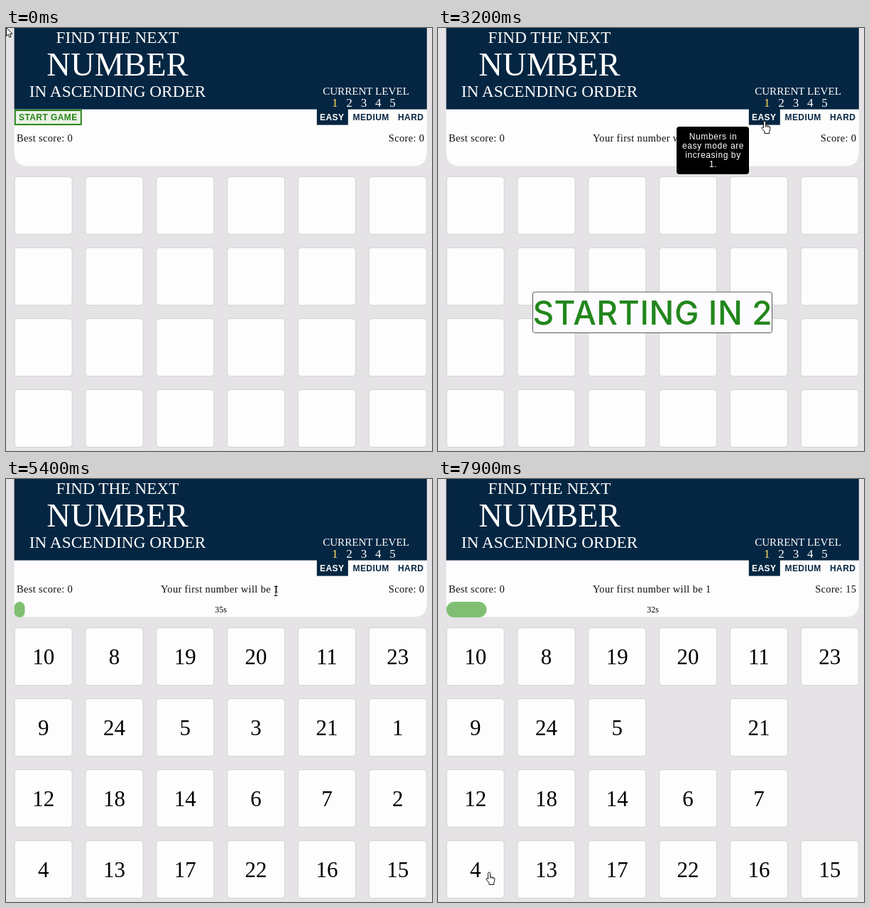
Animation of 600 by 596 pixels, one loop 8000 ms. Source, as an HTML page:

```html
<!DOCTYPE html>
<html lang="en">
<head>
<meta charset="utf-8">
<title>Find the next number</title>
<style>
  html, body { margin: 0; width: 100%; height: 100%; overflow: hidden; background: #e5e3e5; }
  svg { display: block; width: 600px; height: 596px; }
  text { white-space: pre; }
  .serif { font-family: "Liberation Serif", "Times New Roman", serif; }
  .sans { font-family: "Liberation Sans", Arial, sans-serif; }
  .title { fill: #fff; text-anchor: middle; }
  .label { font-weight: bold; font-size: 12px; letter-spacing: .42px; }
  .info { font-size: 14.5px; letter-spacing: .33px; fill: #111; }
  .tile rect { fill: #fefdfe; stroke: #d3d2d4; }
  .tile text { font-size: 31px; text-anchor: middle; }
  .tip { font-size: 12px; letter-spacing: .6px; text-anchor: middle; }
  .tip text { fill: #fff; }
  .count { font: 500 46px Montserrat, Inter, sans-serif; letter-spacing: .6px; fill: #22871c; text-anchor: middle; }
  #cursor path { fill: #fff; stroke: #111; stroke-linejoin: round; }
</style>
</head>
<body>
<svg id="stage" viewBox="0 0 600 596">
  <path d="M11.6 114H592.8V175Q592.8 194.6 573 194.6H32Q11.6 194.6 11.6 175Z" fill="#fefdfe"/>
  <rect x="11.6" width="581.2" height="114.6" fill="#052642"/>
  <g class="serif title">
    <text x="157" y="20.5" font-size="23.3">FIND THE NEXT</text>
    <text x="157" y="67" font-size="46.6">NUMBER</text>
    <text x="157" y="97" font-size="23.3">IN ASCENDING ORDER</text>
    <text x="507" y="93.5" font-size="15.1">CURRENT LEVEL</text>
    <g id="levels" font-size="17"></g>
  </g>
  <g class="sans label">
    <rect x="437.8" y="114" width="44" height="22.6" fill="#052642"/>
    <text x="442" y="129.5" fill="#fff">EASY</text>
    <text x="488.5" y="129.5" fill="#052642">MEDIUM</text>
    <text x="552" y="129.5" fill="#052642">HARD</text>
    <g id="start">
      <rect x="12.8" y="116" width="93" height="20" fill="#eaf2e5" stroke="#28841b" stroke-width="2"/>
      <text x="18" y="129.5" fill="#28841b">START GAME</text>
    </g>
    <g id="startHover">
      <rect x="11.6" y="115" width="92.4" height="21.6" fill="#28801a"/>
      <text x="16.5" y="129.5" fill="#fff">START GAME</text>
    </g>
  </g>
  <g class="serif info">
    <text x="15" y="160">Best score: 0</text>
    <text id="first" x="218" y="160">Your first number will be 1</text>
    <text id="score" x="589.3" y="160" text-anchor="end"></text>
  </g>
  <g id="timer">
    <rect id="bar" x="11.8" y="173" height="22" fill="#80bf73"/>
    <text id="seconds" class="serif" x="302.5" y="188" font-size="12" text-anchor="middle"></text>
  </g>
  <g id="tiles" class="serif"></g>
  <g id="dialog">
    <rect id="dialogBox" y="372" height="57.5" rx="3" fill="#fcfbfd" stroke="#5a5a5c"/>
    <text id="dialogText" class="count" x="302.3" y="418"></text>
  </g>
  <g id="tooltip" class="sans tip">
    <rect x="336" y="139" width="102" height="67" rx="4"/>
    <text x="387.5" y="156.5">Numbers in</text>
    <text x="387.5" y="169.5">easy mode are</text>
    <text x="387.5" y="182.5">increasing by</text>
    <text x="387.5" y="195.5">1.</text>
  </g>
  <g id="cursor">
    <path id="arrow" d="M.5 .5V12.5L3.2 10L5 14.2L7 13.4L5.2 9.3H9Z"/>
    <g id="hand">
      <path d="M-1.5 1.5C-1.5-.4 1.5-.4 1.5 1.5V6.5L6.3 7.6Q8.3 8.2 8 10.5L6.7 15V17.5H0V15L-3.8 10.6Q-4.6 8.4-2.4 8.8L-1.5 9.8Z"/>
      <path d="M1.5 6.5V9M4 7V9.3M6.2 7.8V9.8" stroke-width=".8"/>
    </g>
    <path id="beam" d="M-2.5-6.5H2.5M0-6.5V6.5M-2.5 6.5H2.5"/>
  </g>
</svg>
<script>
const LOOP = 8000, STEP = 100;
const CLICK = 1600, GO = 4600, SECOND = 1000;
const PICKS = [6400, 6800, 7500];
const NUMBERS = [10, 8, 19, 20, 11, 23, 9, 24, 5, 3, 21, 1,
                 12, 18, 14, 6, 7, 2, 4, 13, 17, 22, 16, 15];
// time, x, y of the pointer's hot spot
const PATH = [
  [100, 0, -1], [900, 60, 119], [1100, 62, 122], [1700, 62, 122],
  [2200, 460, 136], [2500, 460, 136], [3000, 460, 131], [4700, 460, 131],
  [5200, 380, 158], [5500, 380, 158], [6200, 544, 368], [6400, 544, 382],
  [6700, 550, 440], [6900, 550, 442], [7400, 355, 352], [7500, 355, 352],
  [7900, 72, 554]
];

const $ = id => document.getElementById(id);
const show = (id, on) => $(id).setAttribute("display", on ? "inline" : "none");
const set = (id, attrs) => {
  for (const name in attrs) $(id).setAttribute(name, attrs[name]);
};
const within = (p, x, y, w, h) => p.x >= x && p.x <= x + w && p.y >= y && p.y <= y + h;

const tiles = NUMBERS.map((number, i) => ({
  number,
  x: 12.2 + (i % 6) * 99.8,
  y: 209.7 + Math.floor(i / 6) * 99.95
}));

$("levels").innerHTML = [1, 2, 3, 4, 5].map(n =>
  `<text x="${443 + n * 20.3}" y="111" fill="${n === 1 ? "#ffe25e" : "#fff"}">${n}</text>`
).join("");

$("tiles").innerHTML = tiles.map(({ number, x, y }) =>
  `<g class="tile" id="tile${number}">
     <rect x="${x}" y="${y}" width="81" height="81" rx="4"/>
     <text x="${x + 40.5}" y="${y + 51.3}">${number}</text>
   </g>`
).join("");

function pointerAt(t) {
  const next = PATH.findIndex(key => key[0] > t);
  if (next === 0) return { x: PATH[0][1], y: PATH[0][2] };
  if (next < 0) return { x: PATH.at(-1)[1], y: PATH.at(-1)[2] };
  const [t0, x0, y0] = PATH[next - 1], [t1, x1, y1] = PATH[next];
  const u = (t - t0) / (t1 - t0), e = u * u * (3 - 2 * u);
  return { x: x0 + (x1 - x0) * e, y: y0 + (y1 - y0) * e };
}

function render(time) {
  const t = Math.floor((time % LOOP) / STEP) * STEP;
  const started = t >= CLICK, playing = t >= GO;
  const picked = PICKS.filter(at => t >= at).length;
  const p = pointerAt(t);

  const onStart = !started && within(p, 12, 115, 95, 22);
  const onEasy = within(p, 438, 115, 44, 22);
  const onText = started && within(p, 218, 148, 168, 16);
  const onTile = playing && tiles.some(({ number, x, y }) =>
    number > picked && within(p, x, y, 81, 81));

  show("start", !started && !onStart);
  show("startHover", onStart);
  show("first", started);
  show("tooltip", onEasy);
  $("score").textContent = "Score: " + picked * 5;

  show("dialog", started && !playing);
  const count = 3 - Math.floor((t - CLICK) / SECOND);
  const half = count === 1 ? 163.5 : 168.5;
  set("dialogBox", { x: 302 - half, width: half * 2 });
  $("dialogText").textContent = "STARTING IN " + count;

  show("timer", playing);
  if (playing) {
    const ticks = Math.floor((t - GO) / SECOND);
    const grown = Math.min(1, ((t - GO) % SECOND) / 350);
    const width = (ticks + grown) * 14.7;
    const rx = Math.min(11, width / 2);
    set("bar", { width, rx });
    $("seconds").textContent = 35 - ticks + "s";
  }

  for (const { number } of tiles) {
    show("tile" + number, number > picked);
    $("tile" + number).lastElementChild.style.display = playing ? "" : "none";
  }

  const hand = onStart || onEasy || onTile;
  show("hand", hand);
  show("beam", onText);
  show("arrow", !hand && !onText);
  set("cursor", { transform: `translate(${Math.round(p.x)} ${Math.round(p.y)})` });
}

const origin = performance.now();
function frame() {
  render(performance.now() - origin);
  requestAnimationFrame(frame);
}
frame();
</script>
</body>
</html>
```
